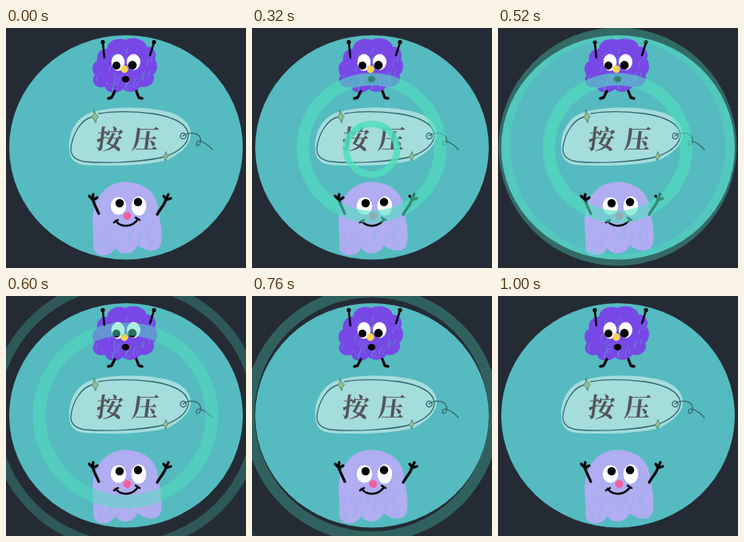
Animation of 300 by 300 pixels, one loop 1.48 s. Source, as an HTML page:

```html
<!DOCTYPE html>
<html lang="zh">
<head>
<meta charset="utf-8">
<style>
  html, body { margin: 0; width: 100%; height: 100%; overflow: hidden; background: #242b35; }
  svg { display: block; width: 100vw; height: 100vh; }
  .ink { fill: none; stroke: #090a0d; stroke-linecap: round; stroke-linejoin: round; stroke-width: 2.6; }
  .bold { stroke-width: 3.4; }
  .thin { fill: none; stroke: #31666a; stroke-width: 1.3; stroke-linecap: round; }
  .star { fill: #92bd91; stroke: #4c7f68; stroke-width: .9; }
  text { font: 600 33px "Noto Serif CJK SC", "Noto Sans CJK SC", "Noto Sans CJK", sans-serif; fill: #54555a; }
</style>
</head>
<body>
<svg viewBox="0 0 300 300">
  <defs>
    <path id="cloud" d="M115 42C113 33 119 26 127 27C128 16 140 12 149 16C160 11 173 15 175 24C184 24 188 32 185 39C190 46 188 55 183 58C187 68 177 75 168 72C162 81 150 80 146 75C138 83 125 80 125 72C113 76 106 67 112 59C107 52 109 44 115 42Z"/>
    <path id="ghost" d="M109 242C109 212 126 193 150 193C176 194 189 209 190 231C193 246 195 261 193 269C190 279 178 281 164 270C161 283 142 285 136 273C133 286 112 287 110 275C111 261 109 252 109 242Z"/>
    <clipPath id="inCloud"><use href="#cloud"/></clipPath>
    <clipPath id="inGhost"><use href="#ghost"/></clipPath>
  </defs>

  <ellipse cx="150" cy="149.3" rx="146" ry="140.2" fill="#55bbc0"/>

  <!-- tag -->
  <path fill="#a5dcdc" d="M79 151C78 130 88 111 108 105C132 99 162 98 188 102C213 105 230 115 231 132C231 148 215 158 202 165C172 173 124 173 97 171C85 169 79 163 79 151Z"/>
  <path class="thin" d="M108 111C94 114 83 132 81 151C81 160 86 165 98 167C130 170 174 167 198 161C216 155 228 145 228 133C226 119 209 111 183 107C159 104 133 104 116 107"/>
  <circle class="thin" cx="221.500" cy="135" r="3.600"/>
  <path class="thin" d="M221 135C229 129 241 131 243 138C245 146 237 150 238 144C239 138 250 143 258 152"/>
  <path class="star" d="M110 102.500Q112 109 115.500 110.500Q112.500 113 112 118.500Q110 113 107 111.500Q110 109 110 102.500Z"/>
  <path class="star" d="M200 154.500Q200.500 159 203 160Q200.500 162 199.500 166.500Q198.500 162 196 161Q199 159 200 154.500Z"/>
  <text x="111 156" y="151" transform="translate(19 0) skewX(-7)">按压</text>

  <!-- upper creature -->
  <use href="#cloud" fill="#7848e6"/>
  <g id="cloudMarks" clip-path="url(#inCloud)" fill="none" stroke="#6199cf" opacity=".8"/>
  <use href="#cloud" fill="none" stroke="#7848e6" stroke-width="2"/>
  <path class="ink" d="M123 37L121 18M180 34L185 18"/>
  <path class="ink bold" d="M136 79L132 87L128 88M163 79L166 87L170 88"/>
  <circle cx="121" cy="17.500" r="2.600"/><circle cx="185" cy="17.500" r="2.600"/>
  <g fill="#fff"><ellipse cx="140" cy="43" rx="8.300" ry="10.500"/><ellipse cx="159.500" cy="42.500" rx="8.500" ry="10"/></g>
  <circle cx="138" cy="47" r="5"/><circle cx="158" cy="46.500" r="5.400"/>
  <circle cx="148" cy="51.500" r="4.700" fill="#f5d452"/>
  <ellipse cx="149.500" cy="64" rx="4.700" ry="4"/>

  <!-- lower creature -->
  <use href="#ghost" fill="#b0adf2"/>
  <g id="ghostMarks" clip-path="url(#inGhost)" fill="none" stroke="#8bb8dc" opacity=".8"/>
  <use href="#ghost" fill="none" stroke="#b0adf2" stroke-width="1.600"/>
  <path class="ink bold" d="M116 232C113 225 110 220 108 213M108 214L104 210M108 214L109 208M109 215L114 212M189 233C193 225 198 222 200 214M200 214L197 210M200 214L203 208M200 215L206 213"/>
  <g fill="#fff"><ellipse cx="140.500" cy="222.500" rx="9.700" ry="11"/><ellipse cx="166" cy="222.500" rx="9.300" ry="12"/></g>
  <circle cx="142" cy="219" r="5.200"/><circle cx="165" cy="217.500" r="5.200"/>
  <circle cx="151.500" cy="235" r="5" fill="#f1609f"/>
  <path class="ink" d="M137 241C144 250 158 249 165 239M135 243L140 240M162 237L167 240"/>

  <g fill="none" stroke="#50dfbe"><circle class="ring" cx="149.500"/><circle class="ring" cx="149.500"/></g>
</svg>
<script>
  const LOOP = 1480, STEP = 40, LIFE = 800, DELAY = 200;
  let seed = 7;
  const random = () => (seed = seed * 16807 % 2147483647) / 2147483647;

  // Loose crayon gaps, arched like hand hatching.
  function scribble(id, count, x, y, w, h, length) {
    let d = "";
    for (let i = 0; i < count; i++) {
      const px = x + random() * w, py = y + random() * h, len = length * (.5 + random());
      d += `M${px} ${py}q${-len * .45} ${len * .3} ${-len * .35} ${len}`;
    }
    const path = document.createElementNS("http://www.w3.org/2000/svg", "path");
    path.setAttribute("d", d);
    path.setAttribute("stroke-width", .9);
    document.getElementById(id).append(path);
  }
  scribble("cloudMarks", 18, 112, 52, 76, 22, 9);
  scribble("cloudMarks", 7, 114, 20, 76, 30, 8);
  scribble("ghostMarks", 22, 112, 240, 82, 30, 15);
  scribble("ghostMarks", 8, 118, 198, 70, 32, 12);

  // Each ring grows and fades; its line swells, then thins out.
  const rings = document.querySelectorAll(".ring");
  function draw(now) {
    const time = Math.floor(now % LOOP / STEP) * STEP;
    rings.forEach((ring, i) => {
      const age = time - i * DELAY;
      const visible = age > 0 && age < LIFE;
      ring.style.display = visible ? "" : "none";
      if (!visible) return;
      const outer = .302 * age - .00003 * age * age;
      const width = age * (LIFE - age) / 10000;
      ring.setAttribute("cy", 152.5 - .008 * age);
      ring.setAttribute("r", outer - width / 2);
      ring.setAttribute("stroke-width", width);
      ring.setAttribute("opacity", 1 - age / LIFE);
    });
  }
  const start = performance.now();
  function tick() {
    draw(performance.now() - start);
    requestAnimationFrame(tick);
  }
  tick();
</script>
</body>
</html>
```
